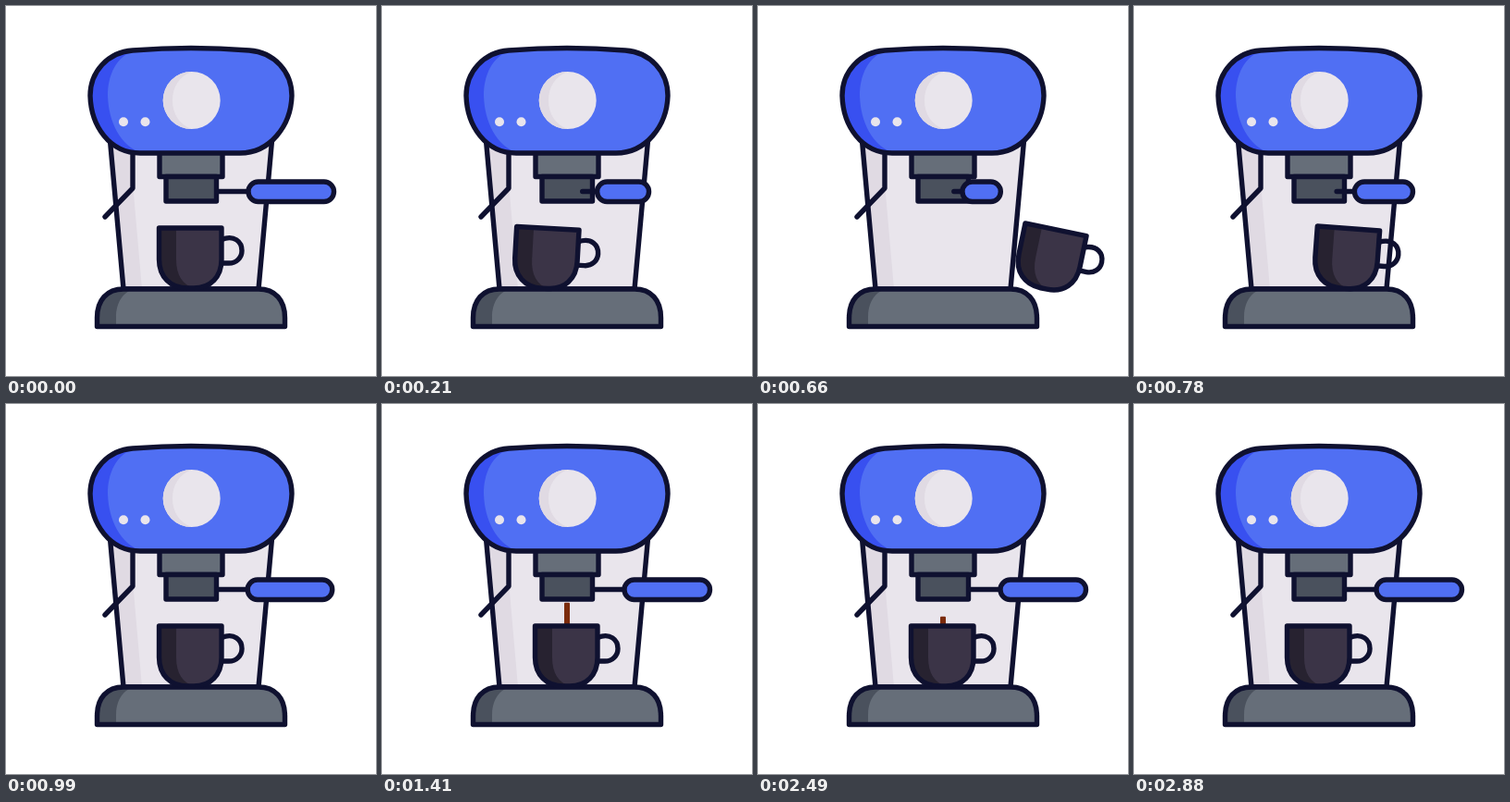
Recreate the animation shown at these times as an HTML page. Size 400x400 px, loop 5270 ms.

```html
<!DOCTYPE html>
<html lang="en">
<head>
<meta charset="utf-8">
<title>Coffee machine</title>
<style>
  html, body { margin: 0; width: 100%; height: 100%; overflow: hidden; background: #fff; }
  svg { display: block; width: 100vw; height: 100vh; }
  .line { fill: none; stroke: #0f1130; stroke-width: 5.4; stroke-linejoin: round; stroke-linecap: round; }
  .blue { fill: #506ff3; }
  .blue-dark { fill: #3850f0; }
  .pale { fill: #e9e5ec; }
  .pale-dark { fill: #e0dae3; }
  .grey { fill: #666e79; }
  .grey-dark { fill: #4a515d; }
  .cup { fill: #3b3447; }
  .cup-dark { fill: #272230; }
</style>
</head>
<body>
<svg viewBox="0 0 400 400">
  <!-- body -->
  <path class="pale" d="M112 140L127 306H273L288 140Z"/>
  <path class="pale-dark" d="M112 140L127 306H147L132.500 140Z"/>
  <path class="line" d="M112 140L127 306H273L288 140"/>
  <path class="line" d="M137 158V197L107 228"/>

  <!-- group head -->
  <path class="line grey" d="M166 155H234V184.500H166Z"/>
  <path class="line grey-dark" d="M173 184.500H227.500V211H173Z"/>

  <!-- housing -->
  <path class="blue" d="M137 48Q200 43 263 48C290 50 309 71 309 97C308 130 285 159 253 159H145C112 159 92 130 91 97C91 71 110 50 137 48Z"/>
  <path class="blue-dark" d="M140 48C119 54 110 75 110 97C111 125 123 151 147 159C112 159 92 130 91 97C91 71 110 50 140 48Z"/>
  <path class="line" d="M137 48Q200 43 263 48C290 50 309 71 309 97C308 130 285 159 253 159H145C112 159 92 130 91 97C91 71 110 50 137 48Z"/>
  <circle class="pale" cx="200.700" cy="102" r="31"/>
  <path class="pale-dark" d="M200.700 71A31 31 0 0 0 200.700 133C187 128 180 116 180 102C180 88 187 76 200.700 71Z"/>
  <circle class="pale" cx="127" cy="125.300" r="5"/>
  <circle class="pale" cx="150.500" cy="125.300" r="5"/>

  <!-- base -->
  <path class="grey" d="M98.500 346.500V337C98.500 318 109 306 127 306H273C291 306 301.500 318 301.500 337V346.500Z"/>
  <path class="grey-dark" d="M98.500 346.500V337C98.500 318 109 306 127 306H140C127 308 119 320 119 337V346.500Z"/>
  <path class="line" d="M98.500 346.500V337C98.500 318 109 306 127 306H273C291 306 301.500 318 301.500 337V346.500Z"/>

  <rect id="stream" x="197" width="6" rx="1" fill="#7b2b0c"/>

  <g id="cup">
    <path class="line" d="M233 252.500C247 247 255 255 255 264.500C255 272 249 278 241 278H232"/>
    <path class="cup" d="M165.500 240H233V274C233 293 221 305 203 305H196C178 305 165.500 293 165.500 274Z"/>
    <path class="cup-dark" d="M165.500 240H184V274C184 291 191 302 204 305H196C178 305 165.500 293 165.500 274Z"/>
    <path class="line" d="M165.500 240H233V274C233 293 221 305 203 305H196C178 305 165.500 293 165.500 274Z"/>
  </g>

  <path id="stem" class="line"/>
  <rect id="grip" class="line blue" y="190" height="21.500" rx="10.700"/>
</svg>
<script>
  const LOOP = 5270;
  const SWAP = 525;
  const [cup, stream, stem, grip] = ['cup', 'stream', 'stem', 'grip']
    .map(id => document.getElementById(id));

  const mix = (a, b, k) => a + (b - a) * k;
  const set = (el, attrs) => {
    for (const name in attrs) el.setAttribute(name, attrs[name]);
  };
  // smooth progress of t from a to b
  const ease = (t, a, b) => {
    const u = Math.min(1, Math.max(0, (t - a) / (b - a)));
    return u * u * (3 - 2 * u);
  };

  // slides out to the left, then a new cup arrives from the right
  function moveCup(t) {
    const leaving = t < SWAP;
    const r = (leaving ? t : Math.max(0, 1015 - t)) / 210;
    const x = 21.4 * Math.pow(r, 3.24) * (leaving ? -1 : 1);
    const tilt = 3.2 * Math.pow(r, leaving ? 2.8 : 2.5);
    set(cup, { transform: `translate(${x} ${tilt * 0.1}) rotate(${tilt} 199.5 272)` });
  }

  // swings towards the viewer and back
  function moveGrip(t) {
    const k = ease(t, 15, 390) - ease(t, 480, 1030);
    const left = mix(262, 207, k);
    const right = mix(354.5, 231, k);
    set(grip, { x: left, width: right - left });
    set(stem, { d: `M${mix(229, 206, k)} 200.500H${left}` });
  }

  function pour(t) {
    const top = mix(214.7, 242, ease(t, 2040, 2880));
    const end = mix(212, 242, ease(t, 1080, 1440));
    set(stream, { y: top, height: Math.max(0, end - top) });
  }

  function draw(now) {
    const t = now % LOOP;
    moveCup(t);
    moveGrip(t);
    pour(t);
  }

  const start = performance.now();
  function tick() {
    draw(performance.now() - start);
    requestAnimationFrame(tick);
  }
  tick();
</script>
</body>
</html>
```
